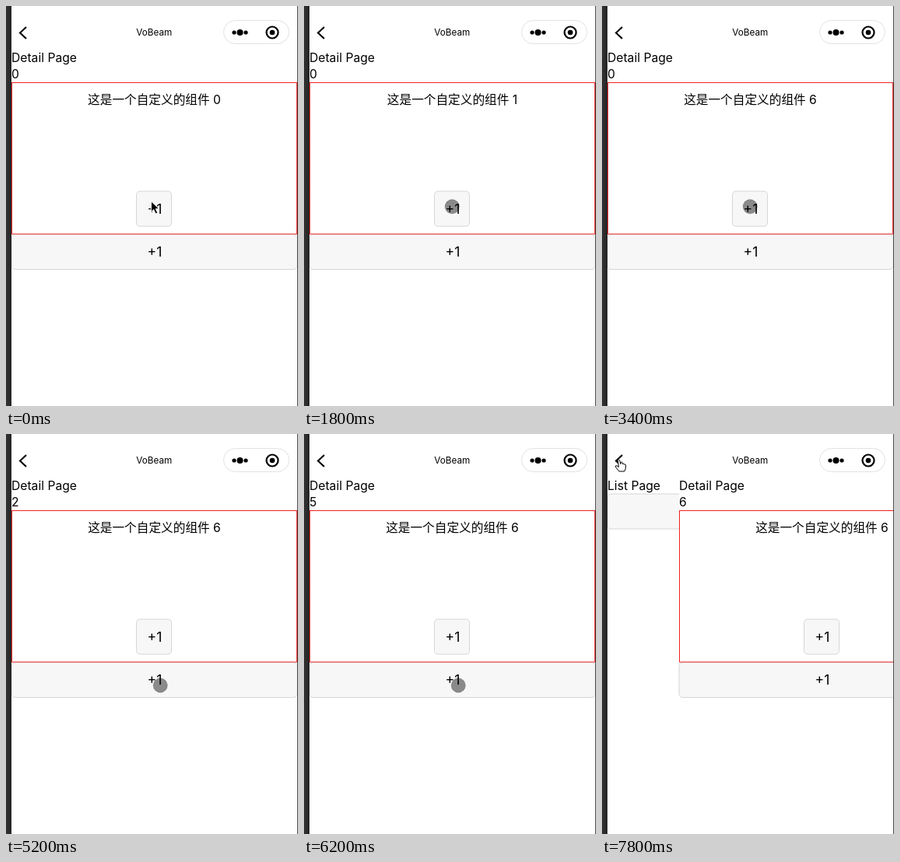
Animation of 375 by 514 pixels, one loop 8000 ms. Source, as an HTML page:

```html
<!DOCTYPE html>
<html lang="en">
<head>
<meta charset="utf-8">
<title>Counter page</title>
<style>
  html, body { margin: 0; width: 100%; height: 100%; overflow: hidden; background: #fff; }
  svg { display: block; width: 375px; height: 514px; }
  text { font: 15.66px Inter, "Noto Sans CJK SC", "Noto Sans CJK", sans-serif; }
  .title { font-size: 11.7px; }
  .label { font-size: 17.6px; }
  .mid { text-anchor: middle; }
  .button { fill: #f7f7f7; stroke: #d6d6d6; }
  .button.pressed { fill: #dedede; }
</style>
</head>
<body>
<svg viewBox="0 0 375 514">
  <defs>
    <linearGradient id="edge">
      <stop stop-color="#343434"/><stop offset="1" stop-color="#242424"/>
    </linearGradient>
  </defs>
  <rect width="375" height="514" fill="#fff"/>

  <g id="list">
    <text x="7" y="71.5">List Page</text>
    <rect class="button" x="7" y="77" width="367" height="45" rx="5"/>
  </g>

  <g id="detail">
    <rect x="7" y="57" width="368" height="457" fill="#fff"/>
    <text x="7" y="71.5">Detail Page</text>
    <text id="pageCount" x="7" y="93.4"></text>
    <rect id="wide" class="button" x="7" y="293.5" width="367" height="45" rx="5"/>
    <rect x="7.5" y="98.5" width="366" height="194.5" fill="none" stroke="#f22222"/>
    <text id="widget" class="mid" x="190.5" y="125.5"></text>
    <rect id="small" class="button" x="167.5" y="238" width="45" height="45" rx="4.5"/>
    <text class="label mid" x="191" y="266.5">+1</text>
    <text class="label mid" x="191" y="322.3">+1</text>
  </g>

  <g id="nav">
    <path d="M26 27L18 34.5L26 42" fill="none" stroke="#000" stroke-width="2.1"/>
    <text class="title mid" x="190.3" y="38.2">VoBeam</text>
    <rect x="279.5" y="18.5" width="84" height="30" rx="15" fill="#fff" stroke="#e2e2e2"/>
    <circle cx="293" cy="34" r="2.6"/>
    <circle cx="300.5" cy="34" r="4"/>
    <circle cx="308" cy="34" r="2.6"/>
    <circle cx="342" cy="34" r="7.5" fill="none" stroke="#000" stroke-width="2.2"/>
    <circle cx="342" cy="34" r="3.3"/>
  </g>

  <rect width="7" height="514" fill="url(#edge)"/>
  <rect x="374" width="1" height="514" fill="#4a4a4a"/>

  <g id="cursor">
    <circle id="touch" r="9.2" fill="#000" fill-opacity=".44" stroke="#000" stroke-opacity=".15"/>
    <path id="arrow" d="M0 0V13.5L3.2 10.6L5.6 16L8.2 14.8L5.8 9.7H10Z" fill="#000" stroke="#fff" stroke-width=".9"/>
    <path id="hand" d="M-1.2 1Q0-1 1.3 1L2.3 5.5Q4-.2 5 5.6Q6.8 4.2 7.4 6.3Q9 5.5 9.2 7.6L8.6 12L7.3 15H.5L-4.2 9.2Q-4.4 7.2-2.4 7.9L0 9.4Z" fill="#fff" stroke="#000"/>
  </g>
</svg>

<script>
const DURATION = 8000;
const $ = id => document.getElementById(id);

// Each entry holds from its start time until the next one.
const widgetSteps = [[0, 0], [1800, 1], [2200, 2], [2400, 3], [2600, 4], [3200, 5], [3400, 6]];
const pageSteps = [[0, 0], [4800, 1], [5200, 2], [5600, 3], [5800, 4], [6200, 5], [6600, 6]];
const cursorSteps = [
  [0, 'arrow', 186.5, 251], [800, 'arrow', 187, 249], [1000, 'touch', 190, 259],
  [1200, 'touch', 190.2, 257.8], [3800, 'touch', 192, 271], [4000, 'touch', 199, 304],
  [4200, 'touch', 204, 331], [4400, 'touch', 198.2, 323], [6800, 'touch', 139, 225],
  [7000, 'touch', 57, 93], [7200, 'arrow', 20, 30], [7400, 'hand', 21.5, 33]
];
const smallPresses = [1600, 2200, 3000];
const widePresses = [5400, 6400];

const stepAt = (steps, t) => steps.filter(step => step[0] <= t).pop();
const isPressed = (presses, t) => presses.some(start => t >= start && t < start + 200);

function render(t) {
  $('widget').textContent = '这是一个自定义的组件 ' + stepAt(widgetSteps, t)[1];
  $('pageCount').textContent = stepAt(pageSteps, t)[1];
  $('small').classList.toggle('pressed', isPressed(smallPresses, t));
  $('wide').classList.toggle('pressed', isPressed(widePresses, t));

  const sliding = t >= 7800;
  $('list').style.display = sliding ? '' : 'none';
  $('detail').setAttribute('transform', `translate(${sliding ? 92 : 0} 0)`);

  const [, shape, x, y] = stepAt(cursorSteps, t);
  $('cursor').setAttribute('transform', `translate(${x} ${y})`);
  for (const id of ['touch', 'arrow', 'hand']) $(id).style.display = id === shape ? '' : 'none';
}

const startTime = performance.now();
function tick() {
  render((performance.now() - startTime) % DURATION);
  requestAnimationFrame(tick);
}
tick();
</script>
</body>
</html>
```
